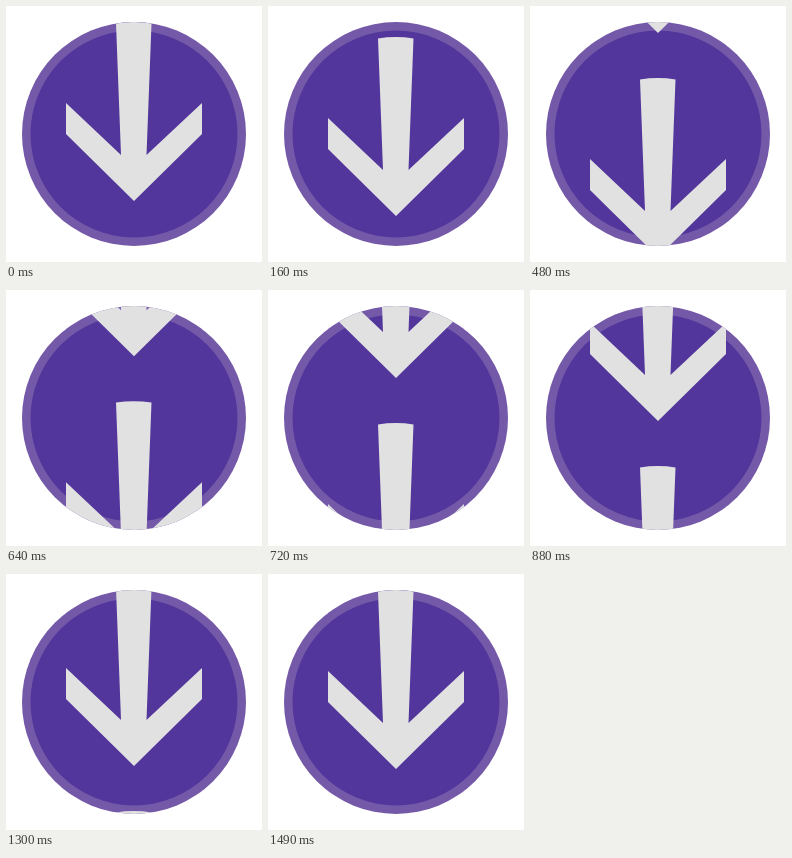
Animation of 256 by 256 pixels, one loop 4170 ms. Source, as an HTML page:

```html
<!DOCTYPE html>
<html lang="en">
<head>
<meta charset="utf-8">
<title>Download arrow</title>
<style>
  html, body { margin: 0; width: 100%; height: 100%; overflow: hidden; background: #fff; }
  svg { display: block; width: 100vw; height: 100vh; }
</style>
</head>
<body>
<svg viewBox="0 0 256 256">
  <defs>
    <clipPath id="disc"><circle cx="128" cy="128" r="112"/></clipPath>
    <path id="arrow" d="M110 17.4 A112 112 0 0 1 145.5 17.4 L140.5 149 L196 97 V128 L128 195 L60 128 V97 L115 149 Z"/>
  </defs>
  <circle cx="128" cy="128" r="112" fill="#7559a9"/>
  <circle cx="128" cy="128" r="103.5" fill="#52369b"/>
  <g clip-path="url(#disc)">
    <g id="track" fill="#e1e1e1">
      <use href="#arrow"/>
      <use href="#arrow" y="-224"/>
    </g>
  </g>
</svg>
<script>
  const LOOP = 4170;
  const LAST = 18;
  const track = document.getElementById('track');

  // Waypoints of the fall: step, distance, speed per step
  const path = [
    [0, 0, 6.5], [4, 33, 9.5], [6, 56, 16], [9, 117, 21.5],
    [11, 160, 19.5], [14, 208, 10], [LAST, 224, 0]
  ];

  // The motion advances in steps, slightly longer towards the end
  function stepAt(ms) {
    if (ms < 1120) return Math.floor(ms / 80);
    if (ms >= 1490) return LAST;
    return Math.min(LAST - 1, 14 + Math.floor((ms - 1120) / 90));
  }

  // Cubic Hermite curve through the waypoints
  function fall(step) {
    const i = Math.max(1, path.findIndex(p => p[0] >= step));
    const [x0, y0, v0] = path[i - 1];
    const [x1, y1, v1] = path[i];
    const h = x1 - x0;
    const u = (step - x0) / h;
    const w = 1 - u;
    return y0 * w * w * (1 + 2 * u) + v0 * h * u * w * w
         + y1 * u * u * (3 - 2 * u) - v1 * h * u * u * w;
  }

  function draw(now) {
    const y = fall(stepAt(now % LOOP));
    track.setAttribute('transform', `translate(0 ${y.toFixed(2)})`);
  }

  const start = performance.now();
  function tick() {
    draw(performance.now() - start);
    requestAnimationFrame(tick);
  }
  tick();
</script>
</body>
</html>
```
